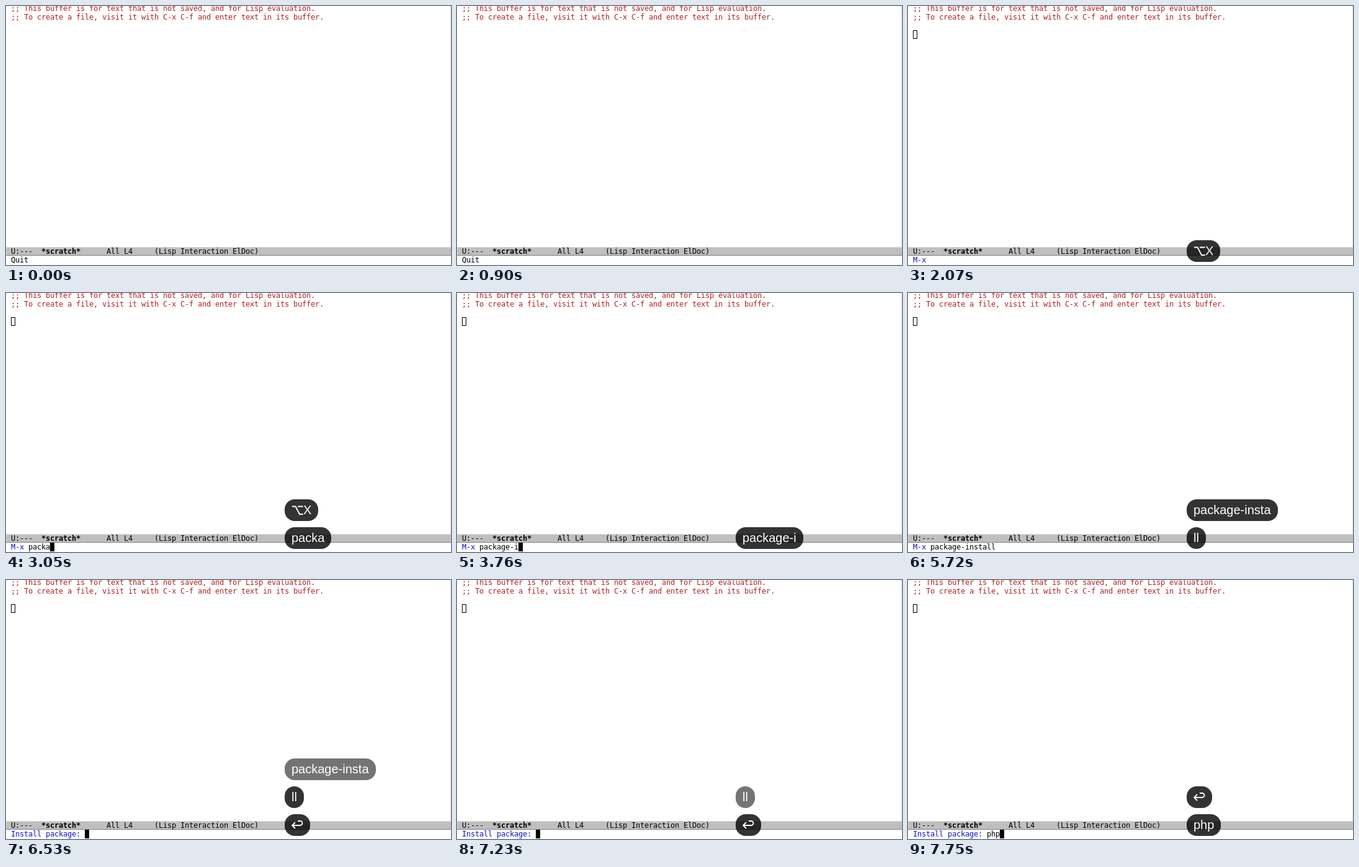
Write an HTML page that moves like this. It is 717x418 px and loops after 8000 ms.

```html
<!DOCTYPE html>
<html lang="en">
<meta charset="utf-8">
<title>Installing a package</title>
<style>
html, body { margin: 0; width: 100%; height: 100%; overflow: hidden; background: #fff; }
#stage { position: relative; width: 717px; height: 418px; overflow: hidden; }
#stage > * { position: absolute; }
.line {
  left: 0; width: 717px; height: 14px; padding-left: 8px; box-sizing: border-box;
  font: 12px/14px "DejaVu Sans Mono", monospace; letter-spacing: calc(7px - 1ch);
  white-space: pre; color: #000;
}
.comment { color: #b22222; }
#prompt { color: #0a14d2; }
#mode { top: 389px; background: #bfbfbf; box-shadow: inset 0 -1px #808080, inset 1px 1px #d4d4d4; }
#edge { left: 716px; top: 0; width: 1px; height: 389px; background: #dedede; }
.cursor { width: 7px; height: 14px; box-sizing: border-box; border: 1px solid #000; }
.key {
  left: 449px; height: 35px; padding: 0 11px; border-radius: 16px;
  background: rgba(0, 0, 0, .8); color: #fff; white-space: pre;
  font: 20px/35px "Liberation Sans", sans-serif;
}
.key svg { width: 19px; height: 35px; vertical-align: top; fill: none; stroke: #fff; stroke-width: 1.8; }
</style>
<div id="stage">
  <div class="line comment" style="top:-3px">;; This buffer is for text that is not saved, and for Lisp evaluation.</div>
  <div class="line comment" style="top:11px">;; To create a file, visit it with C-x C-f and enter text in its buffer.</div>
  <div class="cursor" id="point" style="left:8px;top:39px"></div>
  <div id="edge"></div>
  <div class="line" id="mode">U:---  <b>*scratch*</b>      All L4     (Lisp Interaction ElDoc)</div>
  <div class="line" style="top:403px"><span id="prompt"></span><span id="input"></span></div>
  <div class="cursor" id="caret" style="top:403px;background:#000"></div>
</div>
<script>
const LOOP = 8000, META_X = 1620, ENTER = 6260;
const FADE_STEP = 86, FADE = [.68, .36, .06];
const blinks = [450, 900, 1440, 2070, 2160, 5000, 5090, 5720, ENTER, 6790, 7230];
const icon = d => `<svg viewBox="11 0 19 35"><path d="${d}"/></svg>`;

// Each bubble collects the keys pressed at the given times
const bubbles = [
  { html: icon('M12 11.5h5.5l6.5 12.5h5.5M21 11.5h8.5') + 'X', times: [META_X], fadeAt: 3670, fade: [.36] },
  { text: 'package-insta', fadeAt: 6530,
    times: [2160, 2330, 2600, 2870, 3050, 3320, 3320, 3490, 3670, 3940, 4210, 4380, 4560] },
  { text: 'll', times: [5090, 5270], fadeAt: 7230 },
  { html: icon('M17 13l-5 5l5 5M12 18H25a3.5 3.5 0 0 0 0-7H21'), times: [ENTER], fadeAt: LOOP },
  { text: 'php', times: [7490, 7670, 7750], fadeAt: LOOP },
];

const $ = id => document.getElementById(id);
const countBefore = (times, t) => times.filter(x => x <= t).length;
const typed = (b, t) => b.text.slice(0, countBefore(b.times, t));

for (const b of bubbles) {
  b.el = document.createElement('div');
  b.el.className = 'key';
  if (b.html) b.el.innerHTML = b.html;
  $('stage').append(b.el);
}

function opacity(b, t) {
  if (t < b.times[0]) return 0;
  if (t < b.fadeAt) return 1;
  return (b.fade || FADE)[Math.floor((t - b.fadeAt) / FADE_STEP)] || 0;
}

function draw(t) {
  const on = countBefore(blinks, t) % 2 === 1;
  const inMini = t >= META_X;
  const prompt = !inMini ? '' : t < ENTER ? 'M-x ' : 'Install package: ';
  const [, command, rest, , name] = bubbles;
  const input = !inMini ? 'Quit' : t < ENTER ? typed(command, t) + typed(rest, t) : typed(name, t);

  $('prompt').textContent = prompt;
  $('input').textContent = input;
  $('point').style.visibility = inMini || on ? 'visible' : 'hidden';
  $('point').style.background = inMini ? 'none' : '#000';
  $('caret').style.visibility = inMini && on ? 'visible' : 'hidden';
  $('caret').style.left = 8 + 7 * (prompt + input).length + 'px';

  const started = countBefore(bubbles.map(b => b.times[0]), t);
  bubbles.forEach((b, i) => {
    if (b.text) b.el.textContent = typed(b, t);
    b.el.style.top = 378 - 45 * (started - 1 - i) + 'px';
    b.el.style.opacity = opacity(b, t);
  });
}

const start = performance.now();
function tick() {
  draw((performance.now() - start) % LOOP);
  requestAnimationFrame(tick);
}
tick();
</script>
</html>
```
